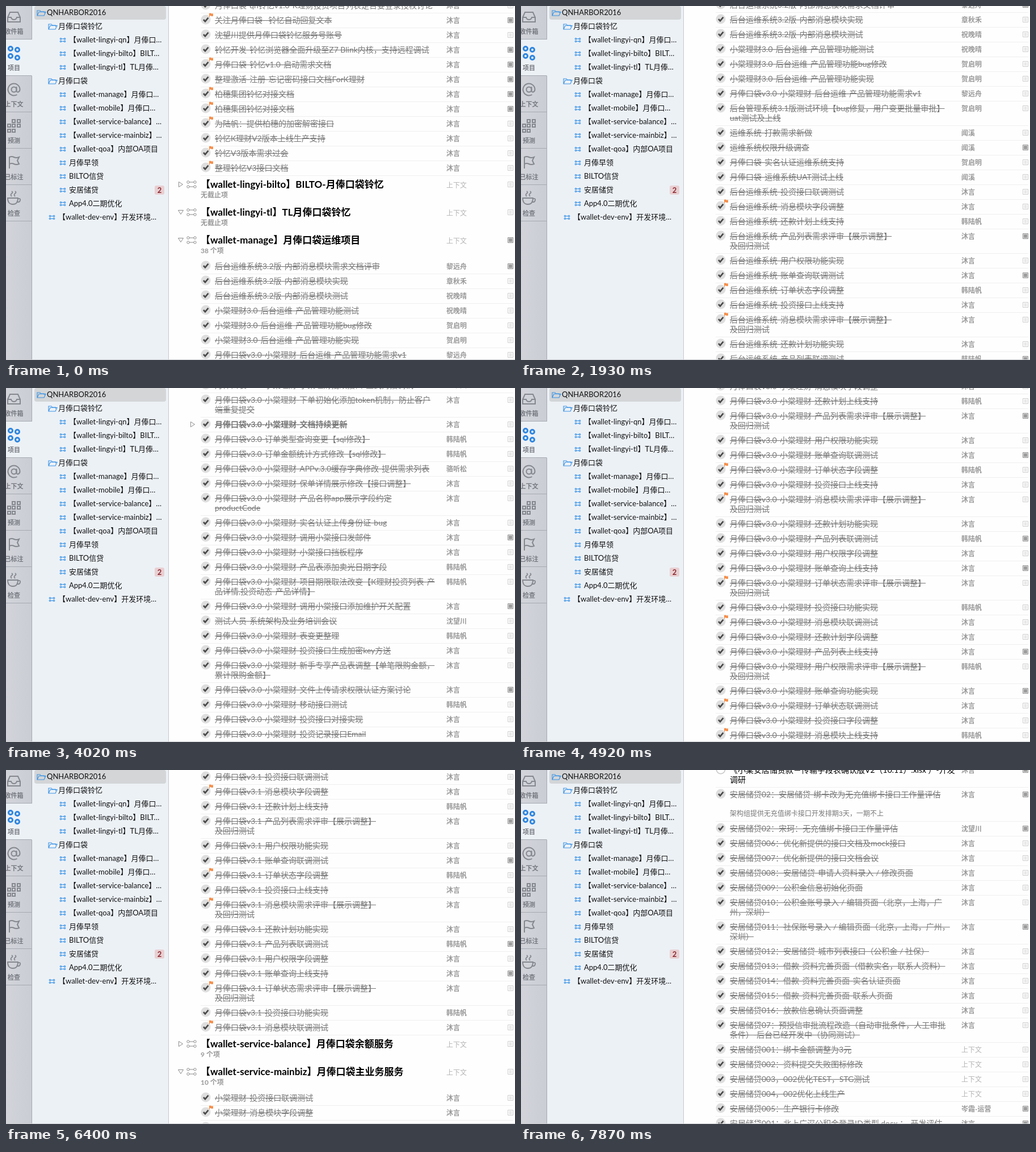
An HTML page that plays this animation: 897 px wide and 623 px high, repeating every 8000 ms.

```html
<!DOCTYPE html>
<html lang="zh-CN">
<head>
<meta charset="utf-8">
<title>任务列表</title>
<style>
html, body { margin: 0; width: 100%; height: 100%; overflow: hidden; background: #fefefe; }
body { position: relative; font: 14px/17px Lato, "Noto Sans CJK SC", "Noto Sans CJK", sans-serif; text-spacing-trim: space-all; }
div, span, .i { position: absolute; white-space: pre; }
.i { width: 1px; height: 1px; overflow: visible; }
#list { left: 0; top: 0; will-change: transform; }
.done { color: #787878; text-decoration: line-through 1px; }
.bold { font-weight: 700; }
.todo { color: #000; }
.who { left: 776px; font-size: 12px; font-weight: 700; color: #999; }
.none { font-weight: 400; color: #b4b4b4; }
.memo { left: 368px; font-size: 12px; color: #777; }
.rule { left: 343px; width: 551px; height: 1px; background: #efefef; }
.title { left: 343px; font-size: 17px; font-weight: 700; color: #000; }
.sub { left: 343px; font-size: 12px; font-weight: 700; color: #999; }
.late { position: static; background: #f5d0d2; color: #7a2630; border-radius: 3px; padding: 0 2px; }
#side { left: 46px; top: 0; width: 240px; height: 623px; background: #ecf1f6; border-right: 1px solid #c3c7cc; }
#sel { left: 50px; top: 0; width: 232px; height: 24px; border-radius: 4px; background: #d3d5d7; }
.nav { font-size: 13px; color: #111; }
#badge { left: 262px; top: 316px; width: 17px; height: 16px; border-radius: 3px; background: #e8cfd1; color: #8a2730; font: 700 13px/16px Lato, sans-serif; text-align: center; }
.tab { left: 0; width: 45px; height: 63px; background: linear-gradient(90deg, #d2d4da, #cacdd4); border-right: 1px solid #a6aab1; border-bottom: 1px solid #a6aab1; }
.tab.on { background: #ecf1f6; border-right-color: #ecf1f6; }
.cap { left: -16px; width: 60px; text-align: center; font-size: 11px; font-weight: 700; color: #777a80; }
#foot { left: 0; top: 622px; width: 897px; height: 1px; background: #cdcfd2; }
</style>
</head>
<body>
<svg width="0" height="0" style="position:absolute"><defs>
  <g id="check"><circle r="8.500" fill="#dedede"/><path d="M-4 0l3 3.200 5.500-6.500" fill="none" stroke="#4a4a4a" stroke-width="2.600"/></g>
  <circle id="open" r="7.600" fill="#fff" stroke="#cbcbcb" stroke-width="1.800"/>
  <circle id="red" r="7.600" fill="#fff" stroke="#ec7279" stroke-width="1.800"/>
  <path id="flag" d="M-3-3q2-1 3.500 0t3.500 0v4.500q-2 1-3.500 0t-2.500 0v2h-1z" fill="#f58f4c"/>
  <g id="note"><path d="M-4.500-4.500h9v9h-9z" fill="#fff" stroke="#cecece"/><path d="M-2.500-2h5m-5 2h5m-5 2h5" stroke="#d2d2d2"/></g>
  <g id="noted"><path d="M-4.500-4.500h9v9h-9z" fill="#e4e4e4" stroke="#8f8f8f"/><path d="M-3-3h6v6h-6z" fill="#9b9b9b"/></g>
  <path id="down" d="M-4.500-3.500h9l-4.500 7z" fill="#fff" stroke="#8c8c8c"/>
  <path id="right" d="M-3.500-4.500v9l7-4.500z" fill="#fff" stroke="#8c8c8c"/>
  <g id="nodes" fill="none"><path d="M-4-4h8m-8 8h8"/><circle cx="-6" cy="-4" r="2.200"/><circle cx="6" cy="-4" r="2.200"/><circle cx="-6" cy="4" r="2.200"/><circle cx="6" cy="4" r="2.200"/></g>
  <use id="project" href="#nodes" stroke="#8c8c8c"/>
  <use id="mini" href="#nodes" stroke="#2f8de4" stroke-width="1.900" transform="scale(.58 .56)"/>
  <path id="folder" d="M-7 5v-9h5l1.500 2h6v2.500M-7 5l3-6.500h12l-3 6.500z" fill="none" stroke="#3a93e6" stroke-width="1.100"/>
  <path id="tab0" d="M-11 1l4-9h14l4 9v8h-22zh6q1 4 5 4t5-4h6" fill="none" stroke="#85888e" stroke-width="2"/>
  <g id="tab1" fill="none" stroke="#2f86e0" stroke-width="3"><circle cx="-6" cy="-8" r="3.500"/><circle cx="6" cy="-6" r="3.500"/><circle cx="-6" cy="5" r="3.500"/><circle cx="6" cy="8" r="3.500"/></g>
  <g id="tab2" fill="none" stroke="#85888e" stroke-width="2"><circle r="4.500"/><path d="M4.500-5v6q0 4 3 3.500 3-1 3-5a10.500 10.500 0 1 0-5 9.500"/></g>
  <path id="tab3" d="M-3-11h5v5h-5zm9 0h5v5h-5zM-11-3h5v5h-5zm8 0h5v5h-5zm9 0h5v5h-5zM-11 6h5v5h-5zm8 0h5v5h-5z" fill="none" stroke="#85888e" stroke-width="2"/>
  <path id="tab4" d="M-8 11v-20q4-2 8 0t9 0l-3 6 3 6q-5 2-9 0t-8 0" fill="none" stroke="#85888e" stroke-width="2"/>
  <path id="tab5" d="M-11-1h18q0 11-9 11t-9-11zM7 0q5-1 4 3t-6 3M-4-4q-3-3 0-5t0-4M2-4q-3-3 0-5t0-4" fill="none" stroke="#85888e" stroke-width="1.800"/>
</defs></svg>
<div id="list"></div>
<div id="side"></div><div id="sel"></div>
<div id="menu" style="left:0;top:0"></div>
<div id="badge">2</div><div id="foot"></div>
<script>
// flags|text|person. Flags: f flag, n filled note, o open, r red, b group, m memo,
// h open / c closed section, * filler rows. "@step y" pins the next row. "~" breaks lines.
const rows = `
|月俸口袋-qn铃忆v1.0-K理财投资项目列表是否要登录授权讨论
fn|关注月俸口袋--铃忆自动回复文本
|沈望川提供月俸口袋铃忆服务号账号
n|铃忆开发-铃忆浏览器全面升级至Z7 Blink内核，支持远程调试
fn|月俸口袋-铃忆v1.0-启动需求文档
n|整理激活-注册-忘记密码接口文档ForK理财
fn|柏穗集团铃忆对接文档
fn|柏穗集团铃忆对接文档
f|为陆帆：提供柏穗的加密解密接口
|铃忆K理财V2版本上线生产支持
f|铃忆V3版本需求过会
f|整理铃忆V3接口文档
c|【wallet-lingyi-bilto】BILTO-月俸口袋铃忆|无截止项
h|【wallet-lingyi-tl】TL月俸口袋铃忆|无截止项
hn|【wallet-manage】月俸口袋运维项目|38 个项
n|后台运维系统3.2版-内部消息模块需求文档评审|黎远舟
|后台运维系统3.2版-内部消息模块实现|章秋禾
|后台运维系统3.2版-内部消息模块测试|祝晚晴
|小棠理财3.0-后台运维-产品管理功能测试|祝晚晴
|小棠理财3.0-后台运维-产品管理功能bug修改|贺启明
|小棠理财3.0-后台运维-产品管理功能实现|贺启明
|月俸口袋v3.0-小棠理财-后台运维-产品管理功能需求v1|黎远舟
|后台管理系统3.1版测试环境【bug修复，用户变更批量审批】~uat测试及上线|贺启明
|运维系统-打款需求新做|闻溪
n|运维系统权限升级调查|闻溪
|月俸口袋-实名认证运维系统支持|贺启明
|月俸口袋-运维系统UAT测试上线|闻溪
*|14|后台运维系统-
|后台运维系统3.1版-体检模块与商保模块的接口设计及改~造开发测试|贺启明
@19 35
f|体检开发-体检套餐|贺启明
n|K理财产品-借款人类型为企业的模型-启明
f|企业信息审核后续联调|章秋禾
n|运维系统3.1.1-版本变更log|贺启明
n|运维提的新需求-查询定期理财的收益数据。在现有账单查询交~易中，对于定期理财类型的账单做一个关联子查询，查询该笔~账单号对应的所有收益数据|贺启明
n|for-启明，关于体检&商保后端的有两个功能需求的处理设计需~要帮忙确认：|沈望川
n|月俸口袋后台3.1.2版本投产变更log|贺启明
f|体检开发-体检机构|贺启明
f|体检开发-体检订单|贺启明
f|体检开发-体检预约|贺启明
n|体检&商保模块－后天开发与运营会议
h|【wallet-mobile】月俸口袋支持项目|100 个项
n|月俸口袋v3.0-打分支[tag]版本|邱伯言
|月俸口袋v3.0-小棠理财-小棠理财批改接口-正式对接调试|-
@27 21
|月俸口袋v3.0-小棠理财-下单初始化添加token机制，防止客户~端重复提交
b|月俸口袋v3.0-小棠理财-文档持续更新
|月俸口袋v3.0-订单类型查询变更【sql修改】|韩陆帆
|月俸口袋v3.0-订单金额统计方式修改【sql修改】|韩陆帆
|月俸口袋v3.0-小棠理财-APPv.3.0缓存字典修改-提供需求列表|骆听松
|月俸口袋v3.0-小棠理财-保单详情展示修改【接口调整】
|月俸口袋v3.0-小棠理财-产品名称app展示字段约定~productCode
|月俸口袋v3.0-小棠理财-实名认证上传身份证-bug
n|月俸口袋v3.0-小棠理财-调用小棠接口发邮件
|月俸口袋v3.0-小棠理财-小棠接口挡板程序
|月俸口袋v3.0-小棠理财-产品表添加卖光日期字段|韩陆帆
|月俸口袋v3.0-小棠理财-项目期限取法改变【K理财投资列表-产~品详情,投资动态-产品详情】|韩陆帆
n|月俸口袋v3.0-小棠理财-调用小棠接口添加维护开关配置
|测试人员-系统架构及业务培训会议|沈望川
|月俸口袋v3.0-小棠理财-表变更整理|韩陆帆
|月俸口袋v3.0-小棠理财-投资接口生成加密key方送
|月俸口袋v3.0-小棠理财-新手专享产品表调整【单笔限购金额，~累计限购金额】
n|月俸口袋v3.0-小棠理财-文件上传请求权限认证方案讨论
|月俸口袋v3.0-小棠理财-移动接口测试|韩陆帆
|月俸口袋v3.0-小棠理财-投资接口对接实现
|月俸口袋v3.0-小棠理财-投资记录接口Email
*|24|月俸口袋v3.0-小棠理财-
@39 16
fn|月俸口袋v3.0-小棠理财-e账户接口添加升级文档
fn|投资动态列表-描述文字确认
|投资动态列表-展现样式参考小棠-建议
|月俸口袋v3.0-理财模块及回归测试
f|月俸口袋v3.0-理财模块-小棠UAT正式产品对接跟进
|月俸口袋v3.0-理财模块及回归测试|韩陆帆
fn|月俸口袋v3.0-小棠理财-批改接口动态挡板程序【模拟还款计~划】
n|接口文档放到qoa上面
n|月俸口袋v3.0-小棠理财-comm_params--参数中的ip地址改成域~名|沈望川
|小棠理财3.0-小棠理财-数据库comm_sequence-添加~wj_contract_info序列
|小棠理财3.0-小棠理财-数据库wj_contract_info表-主键自增长
n|MySQL获取两个日期的月份及天数函数更新
fn|月俸口袋帮助中心更新|韩陆帆
n|月俸口袋v3.1-支付密码与沈望川讨论结果
|消息系统架构设计-月俸口袋v3.3启动|裴知远
|对外接口加密方案实现【小棠方式】
f|月俸口袋v3.3-消息模块api接口改造
f|月俸口袋v3.1-支付密码接口定义
n|月俸口袋v3.1-服务商城接口定义：for方礼
n|月俸口袋-v3.1-启动需求整理
n|体检商城原型需求
n|K理财-产品排序规则-需求规则
*|16|月俸口袋v3.1-
c|【wallet-service-balance】月俸口袋余额服务|9 个项
h|【wallet-service-mainbiz】月俸口袋主业务服务|10 个项
*|8|小棠理财-
@48 19
|K理财保单号回滚到大保单模式
|小棠异步方式获取保单测试
c|【wallet-qoa】内部OA项目|9 个项
c|月俸早领|13 个项
c|BILTO信贷|13 个项
h|安居储贷|51 个项 · <span class="late">2 逾期</span>
o|BUG：填写个人资料绑定银行卡只支持安全卡（改为只支持充~值卡）
o|BUG：公积金明细数据-删除（一个月份多条公积金数据不能只~删除一条）|陶屿
|生产：用户10012345678-变更安全卡、安居储贷卡数据申请|-
|生产：林澈绑定手机已修改为：10087654321，与小棠一致。~请后台修改青藤早享中手机号数据等操作|-
o|孟谦：一阶段优化（提示文案）文案待定|-
o|二阶段额度优化（同步73风控字段）|-
rn|孟谦：安居储贷－小棠发送短信接口改造-提示文案
on|孟谦：安居储贷－小棠预授信接口失败-绑卡不同失败提示文案
n|孟谦：安居储贷公积填写需求及细则具体
n|用户画像数据要求
n|安居储贷待解决问题汇总
n|安居储贷需求说明书-v1.1.docx-2点会议
*|3|安居储贷-
on|《小棠安居储贷款－传输字段表确认版V2（10.11）.xlsx ）-开发~调研
@53 43
mn|安居储贷02：安居储贷-绑卡改为无充值绑卡接口工作量评估
n|安居储贷02：宋珂：无充值绑卡接口工作量评估|沈望川
|安居储贷006：优化新提供的接口文档及mock接口
|安居储贷007：优化新提供的接口文档会议
|安居储贷008：安居储贷-申请人资料录入 / 修改页面
|安居储贷009：公积金信息初始化页面
|安居储贷010：公积金账号录入 / 编辑页面（北京，上海，广~州，深圳）
n|安居储贷011：社保账号录入 / 编辑页面（北京，上海，广州，~深圳）
|安居储贷012：安居储贷-城市列表接口（公积金 / 社保）
|安居储贷013：借款-资料完善页面（借款实名，联系人资料）
|安居储贷014：借款-资料完善页面-实名认证页面
|安居储贷015：借款-资料完善页面-联系人页面
|安居储贷016：放款信息确认页面调整
|安居储贷07：预授信审批流程改造（自动审批条件，人工审批~条件）-后台已经开发中（协同测试）
|安居储贷001：绑卡金额调整为3元|-
|安居储贷002：资料提交失败图标修改|-
|安居储贷003，002优化TEST，STG测试|-
|安居储贷004，002优化上线生产|-
n|安居储贷005：生产银行卡修改|岑霜-运营
n|安居储贷001：北上广深公积金登录ID类型.docx ：-开发评估`;

const topics = ["投资接口", "账单查询", "产品列表", "消息模块", "订单状态", "用户权限", "还款计划"];
const tasks = ["联调测试", "需求评审", "字段调整", "功能实现", "上线支持"];
const icon = (id, x, y) => `<svg class="i" style="left:${x}px;top:${y}px"><use href="#${id}"/></svg>`;
const text = (cls, s, top, left) => `<div class="${cls}" style="top:${top}px${left ? `;left:${left}px` : ""}">${s}</div>`;
const path = [[0, 0], [6, 158], [8, 196], [10, 210], [11, 210]];
let y = -1, html = "", wasSection = false;

function addRow(flags, body, who) {
  const has = f => flags.includes(f);
  const section = has("h") || has("c");
  if (section) {
    y += 3;
    html += icon(has("h") ? "down" : "right", 308, y - .5) + icon("project", 326.5, y - .5) +
      text("title", body, y - 9) + text("sub", who, y + 10) + text("who none", "上下文", y - 7);
  } else {
    const open = has("o") || has("r");
    html += icon(has("r") ? "red" : open ? "open" : "check", 351.5, y - 1) +
      text((open ? "todo" : "done") + (has("b") ? " bold" : ""), body.replace(/~/g, "\n").replace(/&/g, "&amp;"), y - 9, 368) +
      text(who == "-" ? "who none" : "who", who == "-" ? "上下文" : who || "沐言", y - 8);
    if (has("f")) html += icon("flag", 360.5, y - 9);
    if (has("b")) html += icon("right", 328.5, y);
    if (has("m")) html += text("memo", "架构组提供无充值绑卡接口开发排期3天，一期不上", y + 25);
  }
  html += icon(has("n") ? "noted" : "note", 888.5, y - .5);
  if (section) y += 46;
  else {
    y += 26 + 17 * (body.split("~").length - 1) + (has("m") ? 34 : 0);
    html += text("rule", "", y - 13);
  }
}

for (const line of rows.trim().split("\n")) {
  const [flags, body, who] = line.split("|");
  if (flags[0] == "@") {
    const [step, top] = flags.slice(1).split(" ");
    path.push([+step, y - top]);
  } else if (flags == "*") {
    for (let i = 0; i < +body; i++)
      addRow(["", "n", "f"][i * 5 % 7 % 3], who + topics[i * 3 % 7] + tasks[i * 2 % 5] +
        (i % 5 == 3 ? "【展示调整】~及回归测试" : ""), i % 4 == 2 ? "韩陆帆" : "");
  } else addRow(flags, body, who);
}
list.innerHTML = html;

const nav = ["QNHARBOR2016", "月俸口袋铃忆", "【wallet-lingyi-qn】月俸口…", "【wallet-lingyi-bilto】BILT…", "【wallet-lingyi-tl】TL月俸…", "月俸口袋",
  "【wallet-manage】月俸口…", "【wallet-mobile】月俸口…", "【wallet-service-balance】…", "【wallet-service-mainbiz】…",
  "【wallet-qoa】内部OA项目", "月俸早领", "BILTO信贷", "安居储贷", "App4.0二期优化", "【wallet-dev-env】开发环境…"];
menu.innerHTML = nav.map((s, i) => {
  const folder = [0, 1, 5].includes(i), level = i == 0 ? 0 : folder || i == 15 ? 1 : 2;
  const x = [72, 92, 111][level], mid = 12 + 24 * i;
  return icon(folder ? "folder" : "mini", folder ? x - 10 : x - 11, mid) + text("nav", s, mid - 9, x);
}).join("") + ["收件箱", "项目", "上下文", "预测", "已标注", "检查", ""].map((s, i) =>
  `<div class="tab${i == 1 ? " on" : ""}" style="top:${64 * i - 5}px;${i == 6 ? "height:250px" : ""}"></div>` +
  (s && icon("tab" + i, 14, 19 + 64 * i) + text("cap", s, 36 + 64 * i))).join("");

// The scroll advances in discrete steps of roughly 148 ms.
const clock = [[0, 0], [880, 6], [5070, 34], [7870, 53], [8000, 53.9]];
function lerp(points, x) {
  const i = Math.max(1, points.findIndex(p => p[0] >= x));
  const [x0, y0] = points[i - 1], [x1, y1] = points[i];
  return y0 + (y1 - y0) * (x - x0) / (x1 - x0);
}
const start = performance.now();
function draw() {
  const t = (performance.now() - start) % 8000;
  const step = Math.floor(lerp(clock, t) + .05);
  list.style.transform = `translateY(${-Math.round(lerp(path, step))}px)`;
  requestAnimationFrame(draw);
}
draw();
</script>
</body>
</html>
```
